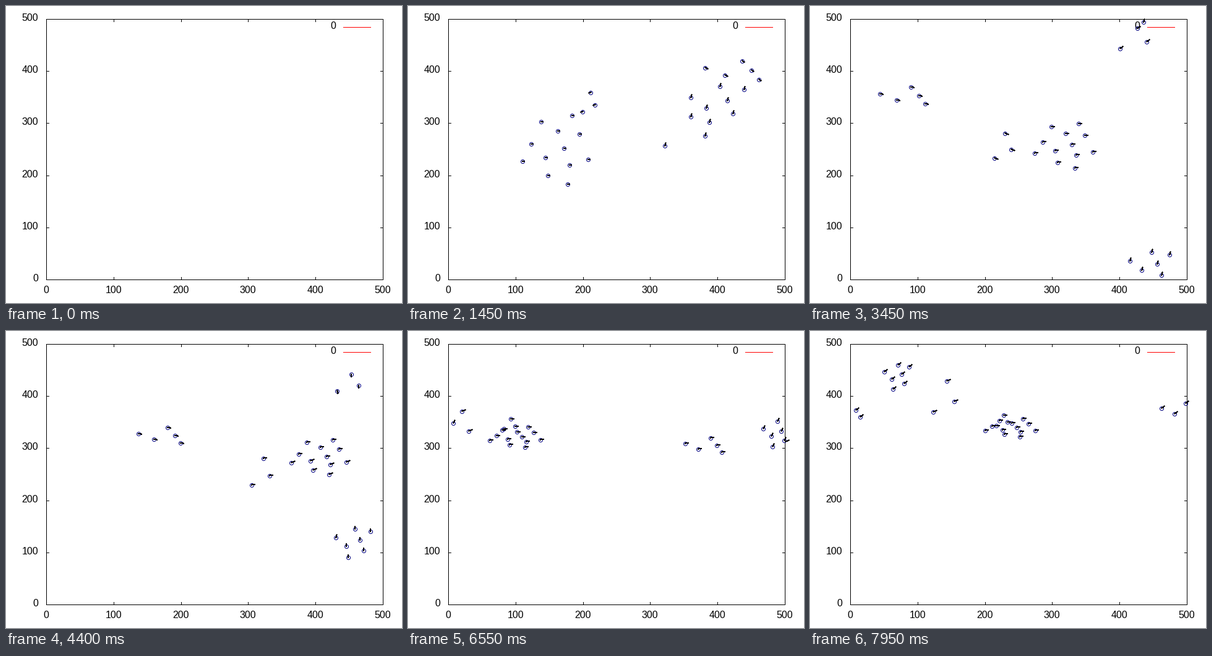
A matplotlib script that plays this animation: 640x480 px, repeating every 8 s.

```python
import numpy as np
import matplotlib.pyplot as plt
from matplotlib.animation import FuncAnimation

W, H, DPI = 640, 480, 100
PX = 72 / DPI                                  # points per pixel
LEFT, RIGHT, TOP, BOTTOM = 65, 609, 20, 441
ORIGIN = np.array([LEFT, TOP])
SPAN = np.array([RIGHT - LEFT, BOTTOM - TOP])
UNIT = SPAN / 500                              # pixels per data unit
SPEED = 5                                      # data units per step
FRAMES, STEP = 160, 50
KNOTS = np.array([29, 45, 69, 108, 131, 159])
GOLDEN = np.pi * (3 - 5 ** .5)
# half a pixel, nudged so that snapping stays on the intended pixel
MID = np.array([.4, .6])

# Each flock: size, first and last radii, and the unwrapped path of its centre.
FLOCKS = [
    (5, (60, 22), (40, 16),
     [(536, 103), (592, 129), (704, 144), (906, 187), (1030, 184), (1149, 127)]),
    (7, (56, 38), (26, 26),
     [(501, 152), (515, 88), (550, -5), (572, -167), (596, -260), (685, -352)]),
    (3, (22, 22), (36, 36),
     [(293, 159), (244, 171), (313, 231), (520, 203), (628, 161), (762, 113)]),
    (12, (66, 62), (50, 16),
     [(239, 229), (291, 228), (411, 223), (606, 178), (718, 170), (868, 155)]),
    (3, (70, 34), (20, 12),
     [(451, 209), (469, 144), (525, 57), (594, 157), (708, 153), (855, 146)]),
]


def length(v):
    return np.maximum(np.linalg.norm(v / UNIT, axis=-1, keepdims=True), 1e-6)


def disc(n):
    """n points spread evenly over the unit disc."""
    i = np.arange(n)
    r = np.sqrt((i + .5) / n)
    return np.column_stack([r * np.cos(i * GOLDEN), r * np.sin(i * GOLDEN)])


def knot_velocities():
    gap = np.diff(KNOTS)[:, None]
    slope = np.diff(paths, axis=1) / gap
    v = np.empty_like(paths)
    v[:, 0] = slope[:, 0]
    v[:, 1:-1] = (slope[:, :-1] * gap[1:] + slope[:, 1:] * gap[:-1]) / (gap[1:] + gap[:-1])
    v[:, -1] = 1.5 * slope[:, -1] - .5 * v[:, -2]
    v[:, 2:] *= SPEED / length(v[:, 2:])
    return v


sizes = [f[0] for f in FLOCKS]
wide = np.repeat([f[1] for f in FLOCKS], sizes, axis=0)
tight = np.repeat([f[2] for f in FLOCKS], sizes, axis=0)
paths = np.array([f[3] for f in FLOCKS], float)
velocities = knot_velocities()
seats = np.concatenate([disc(n) for n in sizes])
curl = np.random.default_rng(4).normal(0, .05, seats.shape)


def centres(t):
    """Flock centres on a Hermite curve through the path points."""
    i = min(np.searchsorted(KNOTS, t, side="right") - 1, len(KNOTS) - 2)
    h = KNOTS[i + 1] - KNOTS[i]
    u = (t - KNOTS[i]) / h
    a, b = paths[:, i], paths[:, i + 1]
    va, vb = velocities[:, i] * h, velocities[:, i + 1] * h
    ease = u * u * (3 - 2 * u)
    return a + (b - a) * ease + va * u * (1 - u) ** 2 - vb * u * u * (1 - u)


def position(t):
    s = max(KNOTS[0] - t, 0)                   # steps left until the flocks form
    u = max(t - KNOTS[0], 0) / (KNOTS[-1] - KNOTS[0])
    spread = wide + (tight - wide) * np.sin(u * np.pi / 2)
    p = np.repeat(centres(t + s), sizes, axis=0) + seats * spread
    if s == 0:
        return p
    launch = np.repeat(velocities[:, 0], sizes, axis=0)
    p = p - launch * (s - s * s / 80) + curl * s * s
    return np.clip(p, (83, 35), (591, 402))


def swarm(t):
    """Wrapped places and heading strokes at step t."""
    p = position(t)
    v = (position(t + .05) - position(t - .05)) / .1
    size = length(v)
    ramp = np.clip((t - KNOTS[0]) / 16, 0, 1)
    v *= (np.minimum(size, SPEED) * (1 - ramp) + SPEED * ramp) / size
    # a bird is carried over one step after it has left the field
    p = p - SPAN * np.floor((position(t - 1) - ORIGIN) / SPAN)
    return np.round(p), v


fig = plt.figure(figsize=(W / DPI, H / DPI), dpi=DPI, facecolor="white")
ax = fig.add_axes([0, 0, 1, 1])
ax.set(xlim=(0, W), ylim=(H, 0))
ax.axis("off")


def stroke(xs, ys, color="black"):
    return ax.plot(np.array(xs) + MID[0], np.array(ys) + MID[1], color=color, lw=PX,
                   antialiased=False, solid_capstyle="projecting")[0]


def label(x, y, text, ha):
    ax.text(x, y, text, ha=ha, va="baseline", family="Liberation Sans",
            fontsize=16 * PX, color="black")


stroke([LEFT, RIGHT, RIGHT, LEFT, LEFT], [TOP, TOP, BOTTOM, BOTTOM, TOP])
for k in range(6):
    x = round(LEFT + k * SPAN[0] / 5)
    y = round(BOTTOM - k * SPAN[1] / 5)
    stroke([x, x], [BOTTOM, BOTTOM - 4])
    stroke([x, x], [TOP, TOP + 4])
    stroke([LEFT, LEFT + 4], [y, y])
    stroke([RIGHT, RIGHT - 4], [y, y])
    label(x, 464, str(100 * k), "center")
    label(52, y + 4, str(100 * k), "right")
label(533, 37, "0", "right")
stroke([545, 589], [33, 33], "#ff0000")

rings, = ax.plot([], [], "o", ms=6 * PX, mfc="none", mec="#000080", mew=PX,
                 antialiased=False, zorder=4)
ticks = stroke([], [])
ticks.set_zorder(5)


def update(n):
    if n == 0:
        rings.set_data([], [])
        ticks.set_data([], [])
        return rings, ticks
    p, v = swarm(n)
    inside = np.all((p >= ORIGIN) & (p <= ORIGIN + SPAN), axis=1)
    rings.set_data(*(p[inside] + MID).T)
    gap = np.full_like(p, np.nan)
    lines = np.stack([p, np.round(p + v), gap], axis=1).reshape(-1, 2)
    ticks.set_data(*(lines + MID).T)
    return rings, ticks


anim = FuncAnimation(fig, update, frames=FRAMES, interval=STEP, repeat=True, repeat_delay=0)
plt.show()
```
